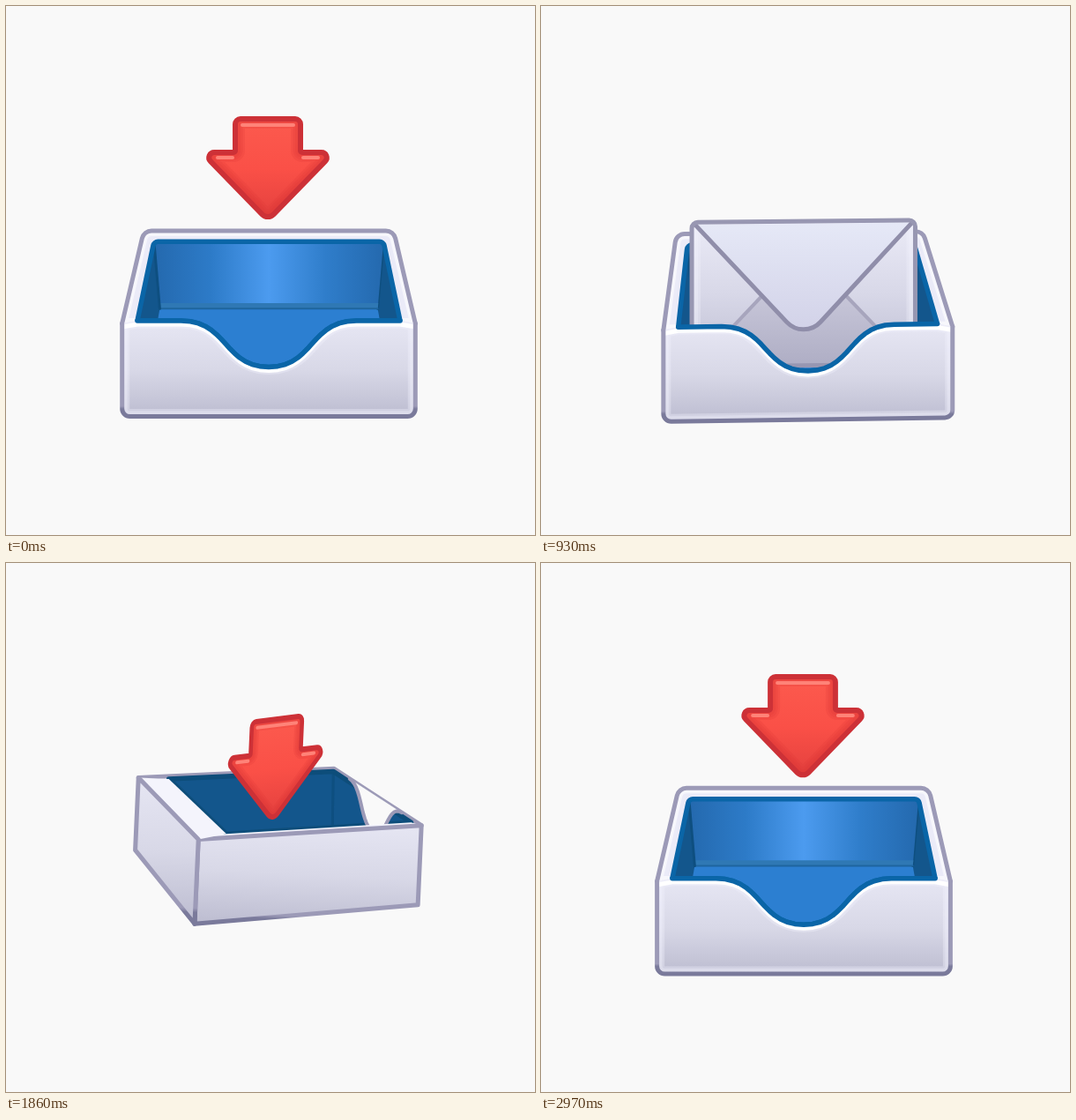
These frames come from a looping animation (600 by 600 pixels, 3 s). An HTML page with a canvas:

```html
<!DOCTYPE html>
<html lang="en">
<head>
<meta charset="utf-8">
<title>Inbox tray</title>
<style>
html, body { margin: 0; width: 100%; height: 100%; overflow: hidden; background: #f9f9f9; }
canvas { display: block; width: 100vmin; height: 100vmin; }
</style>
</head>
<body>
<canvas id="stage" width="600" height="600"></canvas>
<script>
const ctx = document.getElementById('stage').getContext('2d');
const LOOP = 3000, STEP = 30, BG = '#f9f9f9';
const OUTLINE = '#9c9ab7', OUTLINE_DARK = '#7a7a9b';
const { sin, cos, abs, min, max, PI, exp } = Math;

// Timing helpers
const part = (t, a, b) => min(1, max(0, (t - a) / (b - a)));
const smooth = u => u * u * (3 - 2 * u);
const easeOut = u => 1 - (1 - u) ** 3;
const backIn = (u, c) => u * u * ((c + 1) * u - c);
const backOut = (u, c) => 1 - backIn(1 - u, c);
const easeInOut = (u, n) => u < .5 ? (2 * u) ** n / 2 : 1 - (2 - 2 * u) ** n / 2;
const hump = (t, a, b) => sin(PI * part(t, a, b));
const bounce = d => d < 0 ? 0 : 1.9 * sin(2 * PI * d / 340) * exp(-d / 190);

const HIT = 505, SPIN = 1000, JUMP = 1150, LAND = 2200, SPIN_END = 2460;

const squash = t => (t < JUMP + 100 ? bounce(t - HIT) : 0)
  + hump(t, SPIN, 1220) ** 2 + bounce(t - LAND);
const airborne = t => smooth(part(t, JUMP, 1500)) * (1 - smooth(part(t, 2070, 2240)));
const yawAt = t => 2 * hump(t, 800, JUMP) - 360 * easeInOut(part(t, SPIN, SPIN_END), 2.5);

function trayPose(t) {
  const s = squash(t), air = airborne(t), arc = hump(t, JUMP, LAND);
  return {
    s, air,
    yaw: yawAt(t),
    roll: 3 * arc,
    cx: 298 + 6 * arc,
    cy: 303.3 - 34 * air + 18 * s,
    a: 153 - 9 * air + 2.7 * s,
    k: 52.2 - 22 * arc + 8.5 * s,
    h: 97 - 11 * air - 8.5 * s
  };
}

// Points are [x, y, corner radius].
function trace(pts, closed = true) {
  const n = pts.length, last = closed ? n : n - 1;
  ctx.beginPath();
  if (closed) ctx.moveTo((pts[n - 1][0] + pts[0][0]) / 2, (pts[n - 1][1] + pts[0][1]) / 2);
  else ctx.moveTo(pts[0][0], pts[0][1]);
  for (let i = closed ? 0 : 1; i < last; i++) {
    const p = pts[i], q = pts[(i + 1) % n];
    ctx.arcTo(p[0], p[1], q[0], q[1], p[2] || 0);
  }
  if (closed) ctx.closePath();
  else ctx.lineTo(pts[n - 1][0], pts[n - 1][1]);
}

function fill(pts, style) {
  trace(pts);
  ctx.fillStyle = style;
  ctx.fill();
}

function stroke(pts, style, width, closed = true) {
  trace(pts, closed);
  ctx.strokeStyle = style;
  ctx.lineWidth = width;
  ctx.stroke();
}

function innerGlow(pts, style, ...widths) {
  ctx.save();
  trace(pts);
  ctx.clip();
  for (const w of widths) stroke(pts, style, w);
  ctx.restore();
}

function ramp(x0, y0, x1, y1, ...stops) {
  const g = ctx.createLinearGradient(x0, y0, x1, y1);
  stops.forEach((c, i) => g.addColorStop(i / (stops.length - 1), c));
  return g;
}

const round = (p, r) => [p[0], p[1], r];

// Top plane is height 0; u runs right and v towards the viewer.
function camera(p, yaw) {
  const th = yaw * PI / 180, c = cos(th), s = sin(th);
  const a = p.a / (abs(c) + abs(s)) ** .55;
  const project = (u, v, up) => {
    const X = u * c + v * s, Z = v * c - u * s, f = 1 / (1 - .08 * Z);
    return [p.cx + a * X * f, p.cy + (p.k * Z - up) * f];
  };
  project.facing = c;
  return project;
}

function notchShape() {
  const half = [];
  for (let i = 0; i <= 14; i++) {
    const t = i / 14, r = 1 - t;
    half.push([-.6 * r ** 3 - .84 * r * r * t - .93 * r * t * t,
               -.5 * t * t * (3 - 2 * t)]);
  }
  return half.concat(half.slice(0, -1).reverse().map(([u, h]) => [-u, h]));
}
const NOTCH = notchShape();
const OUTER = [[-1, 1], [1, 1], [1, -1], [-1, -1]];
const INNER = [[-.9, .95], [.9, .95], [.9, -.73], [-.9, -.73]];

function drawInterior(P, h, opening, inner) {
  ctx.save();
  trace(opening);
  ctx.clip();
  const base = INNER.map(([u, v]) => P(u * .95, v, -.83 * h));
  ctx.fillStyle = '#2c7fd1';
  ctx.fillRect(0, 0, 600, 600);
  for (let i = 0; i < 4; i++) {
    const j = (i + 1) % 4;
    if (inner[i][0] <= inner[j][0]) continue;
    const wall = [inner[i], inner[j], base[j], base[i]];
    if (i === 2) {
      fill(wall, ramp(inner[3][0], 0, inner[2][0], 0,
        '#2469ae', '#2d7bc8', '#4c9bef', '#2f7dca', '#2469ae'));
      fill([P(.86, -.73, -.76 * h), P(-.86, -.73, -.76 * h), base[3], base[2]], '#2f78b4');
      stroke([base[3], base[2]], '#1e659f', 2, false);
    } else {
      fill(wall, '#13568c');
      stroke([inner[i], base[i]], '#0e4f80', 3, false);
      stroke([inner[j], base[j]], '#0e4f80', 3, false);
    }
  }
  ctx.restore();
}

function drawLetter(p, t) {
  const shown = easeOut(part(t, 470, 550)) - part(t, 1610, 1740) ** 2;
  if (shown <= 0) return;
  const P = camera(p, yawAt(t - 22));
  const rise = 67 - 20 * p.s + 22 * p.air - 195 * (1 - shown);
  const half = .83 * (1 + .05 * p.s);
  const at = (u, down, r) => {
    const up = rise - down * p.h / 96;
    return round(P(u * half, -p.air * up / 400, up), r);
  };
  const body = [at(-1, 0, 7), at(1, 0, 7), at(1, 165, 4), at(-1, 165, 4)];
  const top = min(body[0][1], body[1][1]), low = max(body[2][1], body[3][1]);
  const wide = P.facing > .25;
  fill(body, wide
    ? ramp(0, top, 0, low, '#ebebf7', '#d8d8e8', '#bdbdd1')
    : ramp(0, top, 0, low, '#ffffff', '#f0f0fa', '#c9c9dd'));
  if (wide) {
    innerGlow(body, 'rgba(240,240,252,.3)', 20, 14);
    const pocket = [at(-.97, 165), at(0, 35), at(.97, 165)];
    fill(pocket, ramp(0, top + 80, 0, low, '#c9c8da', '#aeadc4'));
    stroke(pocket, '#a7a5bd', 4, false);
    const flap = [at(-.97, 3), at(0, 136, 26), at(.97, 3)];
    fill(flap, ramp(0, top, 0, top + 125, '#e6e9f7', '#d2d2e8'));
    stroke(flap, '#908eaa', 5, false);
  }
  stroke(body, '#9897b2', 5);
}

function drawArrow(p, t) {
  const late = t > SPIN;
  const travel = late ? 1 - backOut(part(t, 1740, 2100), .9) : backIn(part(t, 0, 470), 1.5);
  if (travel >= 1) return;
  const s = late ? p.s : 0, th = yawAt(t - 60) * PI / 180;
  const shape = [[-37, -114, 6], [37, -114, 6], [37, -76, 2], [75, -76, 6],
                 [0, 1, 9], [-75, -76, 6], [-37, -76, 2]];
  ctx.save();
  ctx.transform(max(.15, abs(cos(th))) * (1 - .08 * s), -.2 * sin(th), 0, 1 + .05 * s,
    297 + 10 * sin(th), 242 + 300 * travel + 36 * s);
  fill(shape, ramp(0, -114, 0, 0, '#fc5a4e', '#fa5047', '#e3403e'));
  innerGlow(shape, 'rgba(214,52,52,.18)', 22, 17, 12);
  stroke([[-29, -107], [29, -107]], '#ff8378', 4, false);
  for (const side of [-1, 1])
    stroke([[side * 40, -70], [side * 57, -70]], '#ff8378', 4, false);
  stroke(shape, '#cd3137', 6);
  ctx.restore();
}

function drawScene(t) {
  const p = trayPose(t), P = camera(p, p.yaw);
  const lit = max(0, P.facing), soft = 11 * lit ** 16;
  const blue = `rgb(${13 - 3 * lit},${77 + 24 * lit},${122 + 45 * lit})`;
  const top = OUTER.map(([u, v]) => P(u, v, 0));
  const bottom = OUTER.map(([u, v]) => P(u, v, -p.h));
  const inner = INNER.map(([u, v]) => P(u, v, 0));
  const front = top[1][0] > top[0][0];
  const notch = v => NOTCH.map(([u, h]) => P(u, v, h * p.h));
  const lip = front ? [inner[0], ...notch(.95), inner[1]] : [inner[0], inner[1]];
  const opening = [...lip, round(inner[2], soft / 2), round(inner[3], soft / 2)];

  ctx.save();
  ctx.translate(p.cx, p.cy);
  ctx.rotate(p.roll * PI / 180);
  ctx.translate(-p.cx, -p.cy);

  const rim = [top[1], round(top[2], soft), round(top[3], soft), top[0]];
  fill(rim, '#ebebf8');
  innerGlow(rim, 'rgba(255,255,255,.6)', 12);
  stroke(rim, OUTLINE, 5, !front);
  drawInterior(P, p.h, opening, inner);
  stroke(opening, blue, 5.5);
  if (!front) {
    const gap = notch(1);
    fill(gap, BG);
    stroke(gap, OUTLINE, 4, false);
  }

  // Contents never show below the tray.
  ctx.save();
  ctx.beginPath();
  ctx.rect(0, -100, 600, 90 + p.cy + (p.k + p.h) * 1.08);
  ctx.clip();
  drawArrow(p, t);
  drawLetter(p, t);
  ctx.restore();

  for (let i = 3; i >= 0; i--) {
    const j = (i + 1) % 4;
    if (top[j][0] <= top[i][0]) continue;
    const y0 = min(top[i][1], top[j][1]), y1 = max(bottom[i][1], bottom[j][1]);
    const bl = round(bottom[i], soft * .8), br = round(bottom[j], soft * .8);
    if (i) fill([top[i], inner[i], inner[j], top[j]], '#f4f4fc');
    const face = i ? [bl, top[i], top[j], br] : [bl, top[0], ...lip, top[1], br];
    fill(face, ramp(0, y0, 0, y1, '#e6e6f3', '#d8d8e7', '#bcbcd0'));
    if (!i) {
      innerGlow(face, 'rgba(240,240,252,.35)', 17, 12);
      stroke([top[0], ...lip, top[1]].map(([x, y]) => [x, y + 4]), '#ffffff', 5, false);
      stroke(lip, blue, 5.5, false);
    }
    const line = ctx.createLinearGradient(0, y0, 0, y1);
    line.addColorStop(.89, OUTLINE);
    line.addColorStop(.92, OUTLINE_DARK);
    stroke([top[i], bl, br, top[j]], line, 5, i !== 0);
  }
  ctx.restore();
}

function frame(now) {
  const t = Math.floor(max(0, now - start) % LOOP / STEP) * STEP;
  ctx.fillStyle = BG;
  ctx.fillRect(0, 0, 600, 600);
  drawScene(t);
  requestAnimationFrame(frame);
}

ctx.lineJoin = 'round';
ctx.lineCap = 'round';
const start = performance.now();
frame(start);
</script>
</body>
</html>
```
